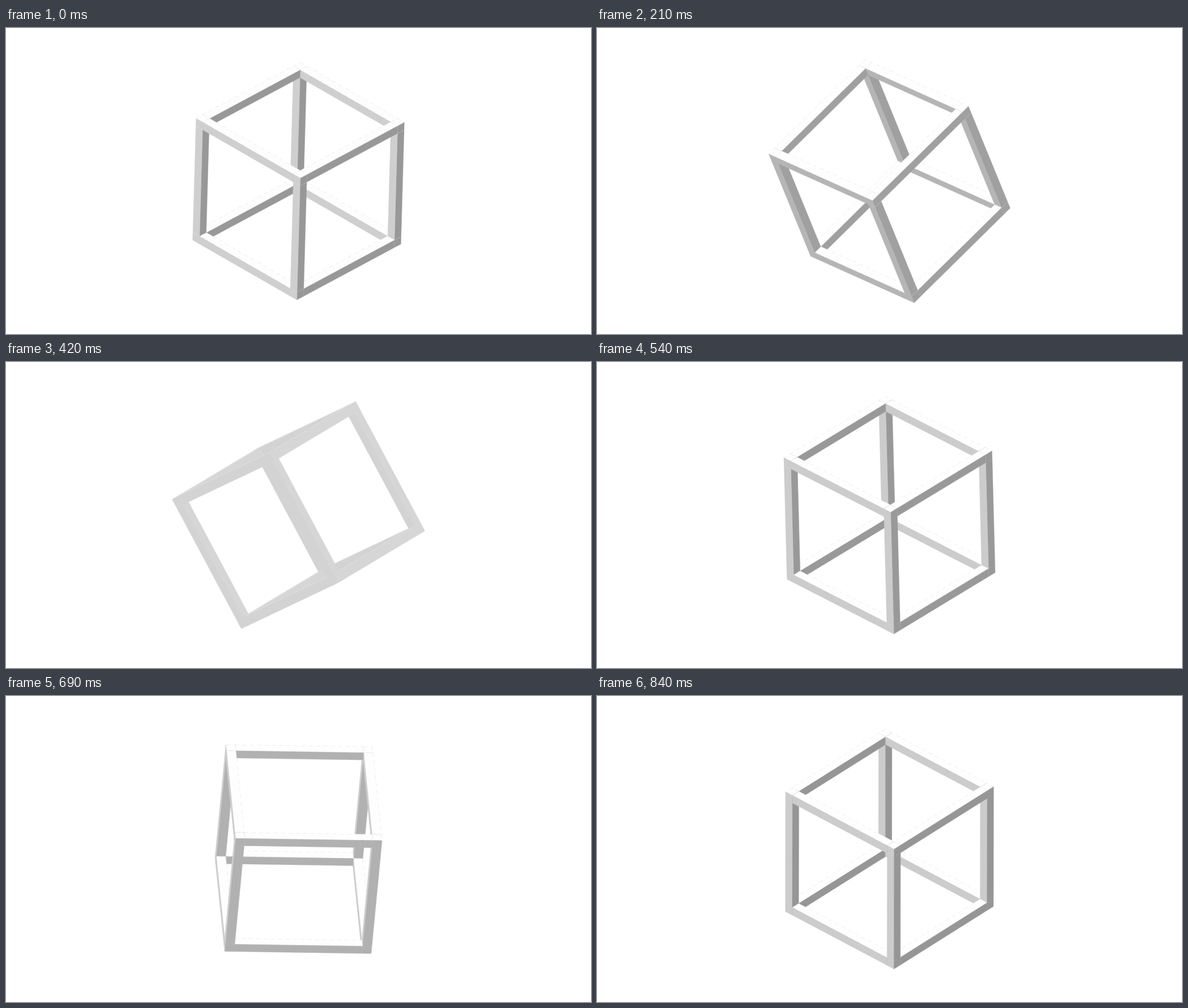
An HTML page with a canvas that plays this animation: 1033x542 px, repeating every 870 ms.

```html
<!DOCTYPE html>
<html lang="en">
<head>
<meta charset="utf-8">
<title>Turning cube frame</title>
<style>
  html, body { margin: 0; height: 100%; overflow: hidden; background: #fff; }
  canvas { display: block; }
</style>
</head>
<body>
<canvas id="stage" width="1033" height="542"></canvas>
<script>
const ctx = document.getElementById('stage').getContext('2d');
const LOOP = 870, STEP = 30;
const CX = 516.5, CY = 271.2;
const GRID = [-130, -113.4, 113.4, 130];  // bar limits along each cube axis
const MAIN = [-36.7, -45, 60];            // main light, scaled by its strength
const FILL = [.45, -.7, .55];             // narrow second light
const PITCH = [0, 90, 90, 0], YAW = [0, 0, 90, 90];
const PACE = [[0, .039], [7, .76], [11, 1.2], [14, 1.53], [18, 1.965], [23, 2.465], [28, 2.951]];

const clamp = (v, lo, hi) => Math.min(hi, Math.max(lo, v));
const dot = (p, q) => p[0] * q[0] + p[1] * q[1] + p[2] * q[2];

// Place on the key path (0..3) at a given step.
function pace(n) {
  const i = PACE.findIndex(p => p[0] >= n);
  if (i < 1) return PACE[0][1];
  const [n0, s0] = PACE[i - 1], [n1, s1] = PACE[i];
  return s0 + (s1 - s0) * (n - n0) / (n1 - n0);
}

// Catmull-Rom curve through the keys, ends repeated.
function spline(keys, s) {
  const i = Math.min(2, Math.floor(s)), r = s - i;
  const key = k => keys[clamp(k, 0, 3)];
  const p = key(i), q = key(i + 1);
  const m = (q - key(i - 1)) / 2, n = (key(i + 2) - p) / 2;
  return p + r * (m + r * (3 * (q - p) - 2 * m - n + r * (2 * (p - q) + m + n)));
}

// Rotate a cube vector by pitch, then yaw, and view it isometrically.
function view([a, b, u], pitch, yaw) {
  const cp = Math.cos(pitch), sp = Math.sin(pitch);
  const cy = Math.cos(yaw), sy = Math.sin(yaw);
  const w = b * sp + u * cp;
  b = b * cp - u * sp;
  [a, u] = [a * cy + w * sy, w * cy - a * sy];
  return [(a - b) / Math.SQRT2, (a + b - 2 * u) / Math.sqrt(6), (a + b + u) / Math.sqrt(3)];
}

function shade(n) {
  const fill = 47 * Math.max(0, dot(n, FILL) - .45);
  return Math.round(Math.min(254, 162 + dot(n, MAIN) + fill));
}

// Corner blocks and bars of the 3 x 3 x 3 grid, back to front.
const cells = [];
for (let i = 0; i < 27; i++) {
  const c = [i % 3, Math.floor(i / 3) % 3, Math.floor(i / 9)];
  if (c.filter(k => k === 1).length < 2) cells.push(c);
}
cells.sort((p, q) => p[0] + p[1] + p[2] - q[0] - q[1] - q[2]);

function drawFace(cell, k, axes, tone) {
  const i = (k + 1) % 3, j = (k + 2) % 3;
  ctx.beginPath();
  for (const [di, dj] of [[0, 0], [1, 0], [1, 1], [0, 1]]) {
    const at = [];
    at[k] = GRID[cell[k] + 1];
    at[i] = GRID[cell[i] + di];
    at[j] = GRID[cell[j] + dj];
    const sum = d => axes.reduce((t, v, m) => t + v[d] * at[m], 0);
    ctx.lineTo(CX + sum(0), CY + sum(1));
  }
  ctx.closePath();
  ctx.fillStyle = ctx.strokeStyle = `rgb(${tone},${tone},${tone})`;
  ctx.lineWidth = .5;
  ctx.setLineDash([]);
  ctx.fill();
  ctx.stroke();
  if (tone > 240) {                        // broken hairline on bright faces
    ctx.strokeStyle = '#ddd';
    ctx.setLineDash([7, 6]);
    ctx.stroke();
  }
}

function draw(now) {
  const s = pace(Math.floor(now % LOOP / STEP));
  const pitch = spline(PITCH, s) * Math.PI / 180;
  const yaw = spline(YAW, s) * Math.PI / 180;
  const axes = [[1, 0, 0], [0, 1, 0], [0, 0, 1]].map(e => {
    const v = view(e, pitch, yaw);
    return v[2] < 0 ? v.map(c => -c) : v;  // the cube is symmetric: face the viewer
  });
  const tones = axes.map(shade);
  ctx.fillStyle = '#fff';
  ctx.fillRect(0, 0, 1033, 542);
  for (const cell of cells) axes.forEach((_, k) => drawFace(cell, k, axes, tones[k]));
}

const start = performance.now();
function tick() {
  draw(performance.now() - start);
  requestAnimationFrame(tick);
}
tick();
</script>
</body>
</html>
```
